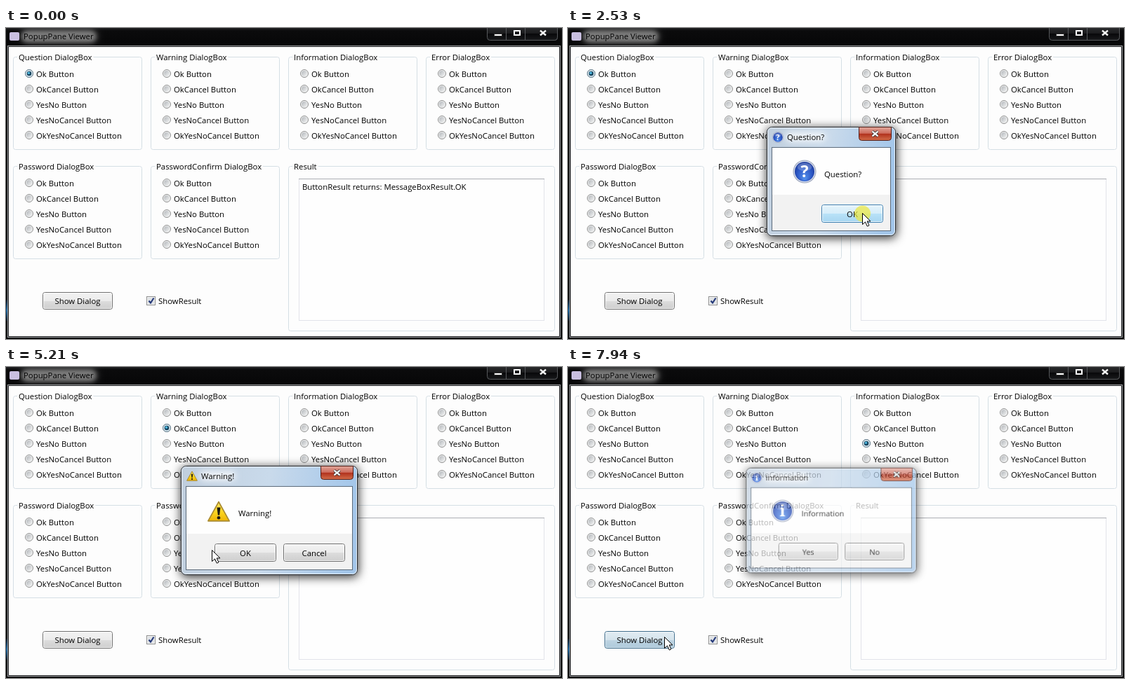
Write an HTML page with a canvas that moves like this. It is 792 px wide and 444 px high and loops after 8 s.

```html
<!DOCTYPE html>
<html lang="en">
<head>
<meta charset="utf-8">
<title>Dialogs</title>
<style>
html, body { margin: 0; width: 100%; height: 100%; overflow: hidden; background: #000; }
canvas { display: block; }
</style>
</head>
<body>
<canvas id="stage" width="792" height="444"></canvas>
<script>
const W = 792, H = 444, LOOP = 8000;
const FONT = '"Open Sans", "Noto Sans", sans-serif';
const TEXT = '11.35px ' + FONT;
const stage = document.getElementById('stage').getContext('2d');
const layer = document.createElement('canvas');
layer.width = W;
layer.height = H;
const layerCtx = layer.getContext('2d');
let g = stage;

const OPTIONS = ['Ok', 'OkCancel', 'YesNo', 'YesNoCancel', 'OkYesNoCancel'];
const GROUPS = [
  ['Question DialogBox', 10, 41], ['Warning DialogBox', 206, 41],
  ['Information DialogBox', 402, 41], ['Error DialogBox', 598, 41],
  ['Password DialogBox', 10, 197], ['PasswordConfirm DialogBox', 206, 197]
];
const DIALOGS = [
  { open: 1560, close: 2640, x: 283, w: 184, icon: 'question', text: 'Question?', buttons: ['OK'] },
  { open: 4560, close: 5780, x: 249, w: 252, icon: 'warning', text: 'Warning!', buttons: ['OK', 'Cancel'] },
  { open: 7835, close: 9999, x: 249, w: 252, icon: 'info', text: 'Information', buttons: ['Yes', 'No'] }
];
// Cursor path: time, x, y
const PATH = [
  [480, 318, 446], [640, 280, 436], [860, 190, 408], [1100, 133, 390],
  [1850, 133, 390], [2000, 215, 352], [2200, 362, 284], [2370, 419, 265],
  [2840, 419, 265], [3000, 372, 216], [3250, 258, 112], [3400, 229, 88],
  [3640, 229, 88], [3800, 205, 160], [4050, 146, 340], [4220, 127, 392],
  [4800, 127, 392], [4960, 180, 342], [5194, 293, 262], [5400, 339, 264],
  [5900, 339, 264], [6060, 392, 200], [6213, 445, 133], [6400, 425, 109],
  [6700, 425, 109], [6860, 375, 170], [7100, 215, 325], [7330, 137, 386]
];
const CLICKS = [1400, 2450, 3450, 4430, 5600, 6520, 7670];
const PRESS = 150;

const STYLES = {
  normal: { border: '#707070', inner: 'rgba(255,255,255,.8)', fill: ['#f3f3f3', '#ebebeb', '#dddddd', '#cdcdcd'] },
  hover: { border: '#3c7fb1', inner: 'rgba(255,255,255,.8)', fill: ['#e6f4fb', '#d5edfa', '#b9e2f8', '#a5d5f0'] },
  held: { border: '#3f6d8c', inner: 'rgba(255,255,255,.5)', fill: ['#e3edf3', '#d4e3ec', '#bed4e2', '#abc8da'] },
  focus: { border: '#1f9ccd', inner: '#46d4f8', fill: ['#edf5f9', '#dfeff7', '#c8e5f3', '#b8ddef'] }
};

function within(t, a, b) { return t >= a && t < b; }

function vgrad(y, h, stops) {
  const grad = g.createLinearGradient(0, y, 0, y + h);
  stops.forEach(([p, c]) => grad.addColorStop(p, c));
  return grad;
}

function glossy(y, h, c) {
  return vgrad(y, h, [[0, c[0]], [0.5, c[1]], [0.5, c[2]], [1, c[3]]]);
}

function rect(x, y, w, h, fill) {
  g.fillStyle = fill;
  g.fillRect(x, y, w, h);
}

function rounded(x, y, w, h, r, fill, stroke) {
  g.beginPath();
  g.roundRect(x, y, w, h, r);
  if (fill) { g.fillStyle = fill; g.fill(); }
  if (stroke) { g.lineWidth = 1; g.strokeStyle = stroke; g.stroke(); }
}

function disc(x, y, r, fill, stroke) {
  g.beginPath();
  g.arc(x, y, r, 0, Math.PI * 2);
  g.fillStyle = fill;
  g.fill();
  if (stroke) { g.lineWidth = 1; g.strokeStyle = stroke; g.stroke(); }
}

function poly(points, fill, stroke, width = 1, open = false) {
  g.beginPath();
  points.forEach(([x, y]) => g.lineTo(x, y));
  if (!open) g.closePath();
  if (fill) { g.fillStyle = fill; g.fill(); }
  if (stroke) { g.lineWidth = width; g.strokeStyle = stroke; g.stroke(); }
}

function label(s, x, y, align = 'left', color = '#000', font = TEXT) {
  g.font = font;
  g.textAlign = align;
  g.fillStyle = color;
  g.fillText(s, x, y);
}

function textWidth(s) {
  g.font = TEXT;
  return g.measureText(s).width;
}

// Soft patch made from the shadow of a shape outside the canvas
function glow(x, y, w, h, r, color, blur) {
  g.save();
  g.shadowColor = color;
  g.shadowBlur = blur;
  g.shadowOffsetX = 2000;
  rounded(x - 2000, y, w, h, r, '#000');
  g.restore();
}

function cross(x, y, size) {
  for (const [color, width] of [['#333', 4], ['#fff', 2.2]]) {
    poly([[x - size, y - size + 0.6], [x + size, y + size - 0.6]], null, color, width, true);
    poly([[x - size, y + size - 0.6], [x + size, y - size + 0.6]], null, color, width, true);
  }
}

function button(x, y, w, h, text, state) {
  const style = STYLES[state];
  rounded(x + 0.5, y + 0.5, w - 1, h - 1, 3, glossy(y, h, style.fill), style.border);
  rounded(x + 1.5, y + 1.5, w - 3, h - 3, 2, null, style.inner);
  label(text, x + w / 2, y + h / 2 + 4.5, 'center');
}

function radio(x, y, on) {
  disc(x, y, 5.5, '#f4f4f4', '#8e8f8f');
  const grad = g.createLinearGradient(x - 4, y - 4, x + 4, y + 4);
  grad.addColorStop(0, '#b2b6ba');
  grad.addColorStop(1, '#f4f5f5');
  disc(x, y, 4, grad);
  if (on) {
    disc(x, y, 5.5, '#d5e4ec', '#6b8494');
    disc(x, y, 3.3, '#16445f');
    disc(x - 0.6, y - 0.7, 1.7, '#4fb8e0');
  }
}

function groupBox(title, x, y, w, h) {
  rounded(x + 0.5, y + 0.5, w - 1, h - 1, 3, null, '#d5dfe5');
  rect(x + 6, y - 2, textWidth(title) + 4, 5, '#fdfdfd');
  label(title, x + 8, y + 5);
}

function windowFrame(active) {
  rect(0, 0, W, H, '#070708');
  rect(0, 0, W, 26, vgrad(0, 26, active
    ? [[0, '#6a6c6f'], [0.1, '#434548'], [0.5, '#2c2e30'], [1, '#1f2123']]
    : [[0, '#222325'], [0.15, '#0b0b0c'], [1, '#060607']]));
  if (active) {
    rect(0, 26, 3, 100, '#5c5f63');
    rect(789, 26, 3, 100, '#9a9da0');
  }
  rect(0, 388, 2, 30, vgrad(388, 30, [[0, '#07131e'], [0.5, '#17609a'], [1, '#07131e']]));

  const title = 'PopupPane Viewer';
  const haze = active ? '#9c9c9c' : '#7c7c7c';
  for (const blur of [12, 6]) glow(23, 5, textWidth(title) + 5, 14, 6, haze, blur);
  rounded(5, 6, 14, 12, 2, '#c9bfe0');
  label(title, 25, 16);

  const edge = active ? '#a2a5a8' : '#56585b';
  const dark = vgrad(0, 17, active
    ? [[0, '#8c8e91'], [0.5, '#5b5d60'], [0.5, '#242628'], [1, '#484a4d']]
    : [[0, '#292a2c'], [0.5, '#19191b'], [0.5, '#08080a'], [1, '#18191b']]);
  const red = active
    ? vgrad(0, 17, [[0, '#d49a90'], [0.48, '#b95448'], [0.5, '#98200f'], [1, '#c95a38']])
    : dark;
  rounded(685.5, -4.5, 100, 22, 4, dark, edge);
  rounded(739.5, -4.5, 46, 22, [0, 0, 4, 0], red, edge);
  rect(712, 0, 1, 17, edge);
  rect(695, 8, 12, 4, '#333');
  rect(696, 9, 10, 2, '#fff');
  g.lineWidth = 2;
  g.strokeStyle = '#fff';
  g.strokeRect(724, 4, 8, 6);
  cross(765, 7, 4);

  // Bright outline, dark inner line, then the client area
  rect(2, 25, 788, 417, active ? '#c4c6c8' : '#a4a6a8');
  rect(3, 26, 786, 415, '#1b1c1e');
  rect(4, 27, 784, 413, '#fdfdfd');
}

function mainWindow(t, p, dialogOpen) {
  const active = within(t, 1400, 1560) || within(t, 2640, 4560) || within(t, 5780, 7835);
  windowFrame(active);

  const pick = t < 3540 ? 0 : t < 6600 ? 1 : 2;
  GROUPS.forEach(([title, x, y], i) => {
    groupBox(title, x, y, 184, 133);
    OPTIONS.forEach((name, j) => {
      radio(x + 23, y + 24 + j * 22, i === pick && j === pick);
      label(name + ' Button', x + 33, y + 29 + j * 22);
    });
  });

  const returned = within(t, 2640, 3540) || within(t, 5780, 6600);
  groupBox('Result', 402, 197, 380, 236);
  rect(417, 215, 350, 203, '#e2e3ea');
  rect(418, 216, 348, 201, '#fefefe');
  rect(417, 215, 350, 1, '#abadb3');
  if (t < 1480 || returned) {
    label('ButtonResult returns: MessageBoxResult.OK', 422, 231);
  }

  const over = t >= 480 && within(p[0], 52, 152) && within(p[1], 377, 402);
  const focused = !dialogOpen && returned;
  button(52, 377, 100, 25, 'Show Dialog', over ? 'held' : focused ? 'focus' : 'normal');

  rect(200, 383, 13, 13, '#f4f4f4');
  g.lineWidth = 1;
  g.strokeStyle = '#8e8f8f';
  g.strokeRect(200.5, 383.5, 12, 12);
  rect(202, 385, 9, 9, '#dfe2e5');
  poly([[203.5, 389.5], [206, 392.5], [210.5, 385.5]], null, '#263a7a', 2.2, true);
  label('ShowResult', 217, 394);
}

function icon(kind, x, y, r) {
  if (kind === 'warning') {
    g.lineJoin = 'round';
    const grad = vgrad(y - r, r * 2, [[0, '#ffe96a'], [0.55, '#fbd21c'], [1, '#e8a800']]);
    poly([[x, y - r * 0.88], [x + r * 0.92, y + r * 0.78], [x - r * 0.92, y + r * 0.78]], grad, '#a98a30', Math.max(1, r / 10));
    g.lineJoin = 'miter';
    poly([[x - r * 0.15, y - r * 0.4], [x + r * 0.15, y - r * 0.4], [x + r * 0.07, y + r * 0.27], [x - r * 0.07, y + r * 0.27]], '#1c1a10');
    disc(x, y + r * 0.5, r * 0.14, '#1c1a10');
    return;
  }
  disc(x, y, r, '#a3acc2');
  disc(x, y, r * 0.92, '#dfe5f0');
  const grad = g.createRadialGradient(x, y + r * 0.6, r * 0.1, x, y, r);
  grad.addColorStop(0, '#4f8be8');
  grad.addColorStop(0.6, '#2b56c4');
  grad.addColorStop(1, '#1c3590');
  disc(x, y, r * 0.85, grad);
  g.beginPath();
  g.ellipse(x, y - r * 0.4, r * 0.62, r * 0.36, 0, 0, Math.PI * 2);
  g.fillStyle = 'rgba(255,255,255,.22)';
  g.fill();
  const font = kind === 'info'
    ? `bold ${r * 1.45}px "Noto Serif", serif`
    : `bold ${r * 1.4}px ${FONT}`;
  label(kind === 'info' ? 'i' : '?', x, y + r * 0.5, 'center', '#fff', font);
}

function dialog(d, p, ready) {
  const { x, w } = d, y = 141, h = 156, right = x + w;
  glow(x, y + 2, w + 1, h + 1, 8, 'rgba(0,0,0,.8)', 14);
  rounded(x + 0.5, y + 0.5, w - 1, h - 1, 7, '#b9d1ea', '#20252b');
  const glass = g.createLinearGradient(x, y, right, y + 30);
  glass.addColorStop(0, '#c0cedd');
  glass.addColorStop(0.5, '#c9daeb');
  glass.addColorStop(1, '#a3c6ea');
  rounded(x + 1.5, y + 1.5, w - 3, h - 3, 6, glass, 'rgba(255,255,255,.75)');

  glow(x + 27, 149, textWidth(d.text) + 4, 13, 6, 'rgba(255,255,255,.8)', 10);
  icon(d.icon, x + 16, 156, 8);
  label(d.text, x + 29, 160);

  const cx = right - 53;
  rounded(cx + 0.5, y + 0.5, 46, 19, [0, 0, 4, 4],
    vgrad(y, 20, [[0, '#e2a99d'], [0.47, '#cd6b5c'], [0.5, '#b0301c'], [1, '#d4704c']]), '#54211b');
  cross(cx + 23.5, y + 10, 4);

  rect(x + 7, 170, w - 14, 120, '#5c6b7b');
  rect(x + 8, 171, w - 16, 118, '#fefefe');
  rect(x + 8, 238, w - 16, 51, '#f2f2f2');
  icon(d.icon, x + 54, d.icon === 'warning' ? 207 : 205, 16.5);
  label(d.text, x + 82, 213);

  d.buttons.forEach((name, i) => {
    const bx = right - 106 - (d.buttons.length - 1 - i) * 98;
    const over = ready && within(p[0], bx, bx + 88) && within(p[1], 252, 278);
    button(bx, 252, 88, 26, name, over ? 'hover' : 'normal');
  });
}

// Opening eases out, closing shrinks and fades
function dialogPhase(d, t) {
  if (t < d.open || t > d.close + 200) return 0;
  if (t >= d.close) return 1 - (t - d.close) / 200;
  const k = Math.min(1, (t - d.open) / 215);
  return 1 - (1 - k) ** 2;
}

function pointer(t) {
  const i = PATH.findIndex(k => k[0] > t);
  if (i < 0) return PATH[PATH.length - 1].slice(1);
  if (i === 0) return PATH[0].slice(1);
  const [t0, x0, y0] = PATH[i - 1], [t1, x1, y1] = PATH[i];
  const k = (t - t0) / (t1 - t0);
  return [Math.round(x0 + (x1 - x0) * k), Math.round(y0 + (y1 - y0) * k)];
}

function cursor(x, y, pressed) {
  if (pressed) disc(x + 0.5, y, 11.5, 'rgba(236,232,64,.72)');
  const shape = [[0, 0], [0, 16], [4, 12.4], [6.8, 18.6], [9.4, 17.4], [6.7, 11.4], [11.5, 11.4]];
  poly(shape.map(([a, b]) => [x + a + 0.5, y + b - 0.5]), '#fff', '#000');
}

function draw(t) {
  const p = pointer(t);
  const d = DIALOGS.find(item => dialogPhase(item, t) > 0);
  g = stage;
  mainWindow(t, p, d && t < d.close);
  if (d) {
    const k = dialogPhase(d, t), s = 0.87 + 0.13 * k;
    g = layerCtx;
    g.clearRect(0, 0, W, H);
    dialog(d, p, k === 1);
    g = stage;
    g.save();
    g.globalAlpha = k;
    g.translate(375, 218.5);
    g.scale(s, s);
    g.drawImage(layer, -375, -218.5);
    g.restore();
  }
  if (t >= 480) cursor(p[0], p[1], CLICKS.some(c => within(t, c, c + PRESS)));
}

// The picture advances in even steps after a still start
function sample(t) {
  return t < 490 ? 0 : 490 + Math.floor((t - 478) / 78.4) * 78.4;
}

const start = performance.now();
function tick() {
  draw(sample((performance.now() - start) % LOOP));
  requestAnimationFrame(tick);
}
tick();
</script>
</body>
</html>
```
